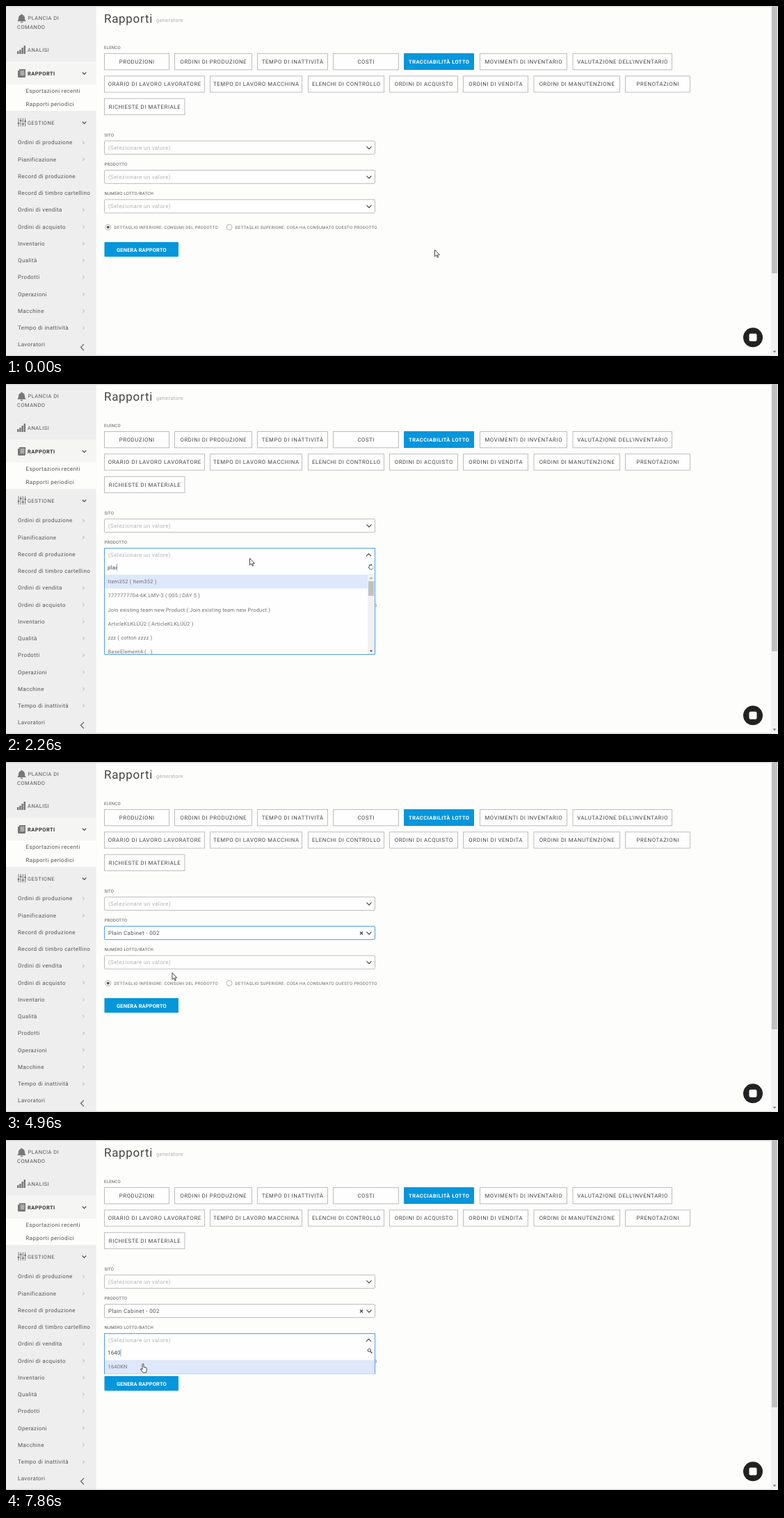
Recreate the animation shown at these times as an HTML page. Size 1110x504 px, loop 8000 ms.

```html
<!DOCTYPE html>
<html lang="it">
<head>
<meta charset="utf-8">
<title>Rapporti</title>
<style>
html, body { margin: 0; width: 100%; height: 100%; overflow: hidden; background: #fdfdfc; }
svg { display: block; width: 1110px; height: 504px; font-family: Roboto, "Noto Sans", sans-serif; text-rendering: geometricPrecision; }
text { fill: #555; white-space: pre; }
.title { font-size: 17px; letter-spacing: .7px; fill: #444; }
.sub { font-size: 7.5px; letter-spacing: .3px; fill: #b0b0b0; }
.head { font-size: 7.5px; letter-spacing: .5px; }
.bold { font-weight: 700; fill: #333; letter-spacing: .45px; }
.item { font-size: 8px; letter-spacing: .38px; }
.hint { fill: #b4b4b4; }
.label { font-size: 6px; letter-spacing: .25px; }
.radio { font-size: 6px; letter-spacing: .33px; fill: #666; }
.tab { font-size: 7.8px; letter-spacing: .6px; fill: #444; text-anchor: middle; }
.active { font-size: 7.5px; font-weight: 700; letter-spacing: .45px; fill: #fff; }
.go { font-size: 7.5px; font-weight: 700; letter-spacing: .15px; fill: #fff; text-anchor: middle; }
.opt { font-size: 7.5px; letter-spacing: .2px; fill: #707070; }
.typed { font-size: 8px; letter-spacing: .15px; fill: #444; }
.line { fill: none; stroke: #444; stroke-width: 1.2; }
.thin { fill: none; stroke: #a5a5a5; stroke-width: .9; }
.box { fill: #fefefe; stroke: #bdbdbd; }
.focus { stroke: #4f9fe0; }
.icon { fill: #777; }
.pointer { fill: #fff; stroke: #333; stroke-width: .9; stroke-linejoin: round; }
</style>
</head>
<body>
<svg id="stage" viewBox="0 0 1110 504"></svg>
<script>
const LOOP = 8000;
const HINT = '(Selezionare un valore)';
const SIZES = { title: 17, item: 8, typed: 8, label: 6, radio: 6, tab: 7.8 };

// y is the middle of the capitals
const text = (x, y, cls, str, id = '') => {
  const size = SIZES[cls.split(' ')[0]] || 7.5;
  return `<text x="${x}" y="${y + size * .356}" class="${cls}" ${id && `id="${id}"`}>${str}</text>`;
};
const rect = (x, y, w, h, fill, extra = '') =>
  `<rect x="${x}" y="${y}" width="${w}" height="${h}" fill="${fill}" ${extra}/>`;
const path = (d, cls, extra = '') => `<path d="${d}" class="${cls}" ${extra}/>`;
const group = (id, body) => `<g id="${id}">${body}</g>`;
const down = (x, y, r = 3.5) => path(`M${x - r} ${y - r / 2}l${r} ${r} ${r} ${-r}`, 'line');
const up = (x, y) => path(`M${x - 3.5} ${y + 1.8}l3.5 -3.5 3.5 3.5`, 'line');

function sidebar() {
  let s = rect(0, 0, 129.5, 504, '#eeeeee') + rect(0, 80, 129.5, 33, '#f5f5f4') + rect(0, 113, 129.5, 38, '#fdfdfc');
  s += path('M16 22q2-1 2-5 .3-3.500 3.500-4.300v-1h2v1q3.200.8 3.500 4.300 0 4 2 5zM20.500 22.700h4q-.4 1.600-2 1.600t-2-1.600z', 'icon');
  [4, 6, 9, 12].forEach((h, i) => s += rect(16 + i * 3.2, 69 - h, 2.4, h, '#777'));
  s += path('M19 91h9v10.500q0 1.500-1.500 1.500h-8q-1.500 0-1.500-1.500V93h2z', 'icon');
  [93.5, 96, 98.5].forEach(y => s += rect(20.5, y, 6, 1, '#f5f5f4'));
  [169, 165, 170, 166].forEach((y, i) => {
    const x = 18 + i * 3.2;
    s += rect(x - .5, 161.5, 1, 12, '#777') + rect(x - 1.3, y - 1, 2.6, 2, '#777');
  });
  s += text(31.5, 17, 'head', 'PLANCIA DI') + text(16, 30, 'head', 'COMANDO');
  s += text(31, 63, 'head', 'ANALISI') + text(31, 97, 'head bold', 'RAPPORTI') + text(31, 168, 'head', 'GESTIONE');
  s += text(28.5, 122.5, 'item', 'Esportazioni recenti') + text(28.5, 141, 'item', 'Rapporti periodici');
  s += down(112.5, 97, 2.8) + down(112.5, 168, 2.8);
  ['Ordini di produzione', 'Pianificazione', 'Record di produzione', 'Record di timbro cartellino',
    'Ordini di vendita', 'Ordini di acquisto', 'Inventario', 'Qualità', 'Prodotti', 'Operazioni',
    'Macchine', 'Tempo di inattività', 'Lavoratori'].forEach((name, i) => {
    const y = 196.5 + i * 24.25;
    s += text(17, y, 'item', name);
    if (![2, 3, 12].includes(i)) s += path(`M110.500 ${y - 2}l2 2.200 -2 2.200`, 'thin');
  });
  return s + path('M112 487l-4.500 4.500 4.500 4.500', 'line', 'style="stroke:#666"');
}

function tabs() {
  const rows = [
    [68.5, ['PRODUZIONI', 141.5, 93], ['ORDINI DI PRODUZIONE', 242.5, 111], ['TEMPO DI INATTIVITÀ', 361.5, 101],
      ['COSTI', 470.5, 94], ['TRACCIABILITÀ LOTTO', 572, 101], ['MOVIMENTI DI INVENTARIO', 681.5, 125],
      ["VALUTAZIONE DELL'INVENTARIO", 815, 142.5]],
    [100.8, ['ORARIO DI LAVORO LAVORATORE', 141.5, 144], ['TEMPO DI LAVORO MACCHINA', 293.5, 132],
      ['ELENCHI DI CONTROLLO', 434.5, 109], ['ORDINI DI ACQUISTO', 551.5, 98], ['ORDINI DI VENDITA', 657.5, 93],
      ['ORDINI DI MANUTENZIONE', 759, 123.5], ['PRENOTAZIONI', 890.5, 93]],
    [133.3, ['RICHIESTE DI MATERIALE', 141.5, 115.5]]
  ];
  return rows.map(([y, ...list]) => list.map(([name, x, w]) => {
    const active = name.startsWith('TRACC');
    return (active ? rect(x, y - .5, w, 24, '#0596db', 'rx="1"') : rect(x, y, w, 23.3, '', 'class="box"')) +
      text(x + w / 2 + .3, y + 11.8, active ? 'tab active' : 'tab', name);
  }).join('')).join('');
}

function field(y, label, id) {
  return text(141.5, y - 8.5, 'label', label) +
    rect(141.5, y, 389, 19.2, '', `class="box" rx="1.500" id="${id}"`) +
    text(147, y + 9.7, 'item hint', HINT, id + 'Hint') + down(522, y + 9.8);
}

function form() {
  let s = text(141, 18, 'title', 'Rapporti') + text(216, 20.8, 'sub', 'generatore');
  s += text(141, 60, 'label', 'ELENCO') + tabs();
  s += field(194.3, 'SITO', 'site') + field(236.5, 'PRODOTTO', 'product') + field(278.8, 'NUMERO LOTTO/BATCH', 'lot');
  s += group('chosen', text(147, 246.2, 'item', 'Plain Cabinet - 002') +
    path('M509 244.500l4 4m0-4l-4 4', 'line'));
  [146.8, 321].forEach(x => s += `<circle cx="${x}" cy="318.500" r="4" fill="#fefefe" stroke="#aaa" stroke-width=".9"/>`);
  s += '<circle cx="146.800" cy="318.500" r="1.900" fill="#555"/>';
  s += text(155.5, 318.5, 'radio', 'DETTAGLIO INFERIORE: CONSUMI DEL PRODOTTO');
  s += text(329.5, 318.5, 'radio', 'DETTAGLIO SUPERIORE: COSA HA CONSUMATO QUESTO PRODOTTO');
  return s + rect(141.5, 340, 106.5, 21, '#0596db', 'rx="1"') + text(195, 351, 'go', 'GENERA RAPPORTO');
}

function chrome() {
  return rect(0, 0, 1100, 1.4, '#d6d6d6') + rect(0, 502.6, 1100, 1.4, '#d9d9d9') +
    rect(1100, 0, 10, 504, '#f1f1f1') + rect(1101, 0, 8, 385, '#c1c1c1') +
    path('M1102.500 496.500h5l-2.500 2.700z', 'icon') +
    '<circle cx="1074" cy="477.300" r="14" fill="#222"/>' + rect(1068.5, 471.8, 11, 11, '#fff', 'rx="2"');
}

function spinner(id, y) {
  let dots = '';
  for (let i = 0; i < 8; i++) {
    const a = i * Math.PI / 4;
    dots += `<circle cx="${525 + 3.3 * Math.cos(a)}" cy="${y + 3.3 * Math.sin(a)}" r="1" fill="#222"/>`;
  }
  return group(id, dots);
}

// Open drop-down; rows start 38 px below its top
function panel(id, y, lists) {
  let s = rect(141.5, y, 389, 49, '', `class="box focus" id="${id}Box"`) +
    text(147, y + 9.7, 'item hint', HINT) + up(521.5, y + 9.5);
  s += rect(142, y + 38, 388, 20, '#dfe7fb', `id="${id}Mark"`);
  s += text(143, y + 44.5, 'opt hint', '..', id + 'Wait');
  lists.forEach((list, n) => {
    s += group(id + 'List' + n, list.map((name, i) => text(146.5, y + 48 + i * 20.2, 'opt', name)).join(''));
  });
  s += text(146, y + 27.2, 'typed', '', id + 'Text') + rect(0, y + 22, .8, 11, '#7d9cc0', `id="${id}Caret"`);
  s += spinner(id + 'Spin', y + 27.2);
  s += group(id + 'Lens', `<circle cx="522.300" cy="${y + 24}" r="2.200" class="line" style="stroke-width:1"/>` +
    path(`M524 ${y + 25.7}l2.500 2.500`, 'line'));
  return group(id, s);
}

function listBar() {
  return group('listBar', rect(520, 275, 10, 114, '#f1f1f1') + rect(521, 284, 8, 21, '#c1c1c1') +
    path('M522.800 280.500h4.400l-2.200-2.400z', 'icon', 'style="fill:#999"') +
    path('M522.800 383.500h4.400l-2.200 2.400z', 'icon', 'style="fill:#444"'));
}

const LONG = ['Item352 ( Item352 )', '7777777704-6K.LMV-3 ( 005 | DAY 5 )',
  'Join existing team new Product ( Join existing team new Product )',
  'ArticleKLKLÜÜ2 ( ArticleKLKLÜÜ2 )', 'zzz ( cotton zzzz )', 'BaseElement4 ( . )'];
const SHORT = ['Plain Cabinet ( Plain Cabinet )', 'Plain Cabinet - 002', 'Plain Cabinet - WIP'];

document.getElementById('stage').innerHTML = sidebar() + form() + chrome() +
  '<clipPath id="clip"><path d="M141 230h390v159H141z"/></clipPath>' +
  `<g clip-path="url(#clip)">${panel('a', 236.5, [LONG, SHORT])}${listBar()}</g>` +
  `<path id="edge" d="M141.500 389.500h389" class="line focus" style="stroke:#4f9fe0;stroke-width:1"/>` +
  panel('b', 278.8, [['1640KN']]) +
  group('arrow', path('M0 0V9.800L2.300 7.800 3.900 11.200 5.300 10.600 3.800 7.300H6.800Z', 'pointer')) +
  group('hand', path('M3 1.300a1 1 0 0 1 2 0V5l3.400.8q1.200.3 1.100 1.700L9.200 10.500 8.300 13H4.200L1 9Q.2 7.700 1.200 7.300L3 8.500Z', 'pointer'));

const el = {};
document.querySelectorAll('[id]').forEach(n => el[n.id] = n);

const show = (id, on) => el[id].setAttribute('display', on ? 'inline' : 'none');
const within = (t, a, b) => t >= a && t < b;

const KEYS_A = [1800, 1930, 2070, 2220, 2350, 2520, 2700, 2900, 3080, 3300, 3600];
const KEYS_B = [6250, 6420, 6580, 6760];
const ROUTE = [[360, 616.5, 351], [980, 350.5, 251], [4200, 350.5, 251], [4520, 240, 300.5], [4570, 240, 300.5],
  [4730, 239, 303.5], [5230, 239, 303.5], [5420, 233.5, 286], [7300, 233.5, 286], [7560, 200, 337.5],
  [7760, 195, 324], [7850, 193, 322]];

function pointerAt(t) {
  const next = ROUTE.findIndex(p => p[0] > t);
  if (next < 1) return (next ? ROUTE[ROUTE.length - 1] : ROUTE[0]).slice(1);
  const [a, b] = [ROUTE[next - 1], ROUTE[next]];
  const k = (t - a[0]) / (b[0] - a[0]);
  const e = k * k * (3 - 2 * k);
  return [a[1] + (b[1] - a[1]) * e, a[2] + (b[2] - a[2]) * e];
}

function typing(id, word, keys, t, caret) {
  el[id + 'Text'].textContent = word.slice(0, keys.filter(k => k <= t).length);
  el[id + 'Caret'].setAttribute('x', 146 + el[id + 'Text'].getComputedTextLength());
  show(id + 'Caret', caret);
}

function busy(id, on, t) {
  show(id + 'Spin', on);
  show(id + 'Lens', !on);
  const step = Math.floor(t / 100);
  [...el[id + 'Spin'].children].forEach((dot, i) => dot.setAttribute('opacity', 1 - ((step - i) % 8 + 8) % 8 * .12));
}

function draw(t) {
  const loaded = t >= 1600, narrowed = t >= 3800;
  show('a', within(t, 1060, 4960));
  el.aBox.setAttribute('height', narrowed ? 98 : loaded ? 153 : 49);
  show('aMark', loaded);
  el.aMark.setAttribute('y', t >= 4600 ? 294.5 : 274.5);
  show('aWait', !loaded);
  show('aList0', loaded && !narrowed);
  show('aList1', narrowed);
  show('listBar', loaded && !narrowed);
  show('edge', loaded && !narrowed);
  typing('a', 'plain cabin', KEYS_A, t, !narrowed);
  busy('a', t < 1600 || within(t, 1800, 3860), t);

  const found = t >= 6150;
  show('b', t >= 5480);
  el.bBox.setAttribute('height', found ? 57.8 : 49);
  show('bMark', found);
  show('bWait', !found);
  show('bList0', found);
  typing('b', '1640', KEYS_B, t, true);
  busy('b', t < 6150 || within(t, 6250, 7200), t);

  show('chosen', t >= 4960);
  show('productHint', t < 4960);
  el.product.classList.toggle('focus', within(t, 4960, 5480));

  const [x, y] = pointerAt(t);
  const hand = within(t, 4200, 4960) && y > 274 || t > 7300 && y > 316;
  show('hand', hand);
  show('arrow', !hand);
  el[hand ? 'hand' : 'arrow'].setAttribute('transform', `translate(${x} ${y})`);
}

let start;
function tick(now) {
  start ??= now;
  draw((now - start) % LOOP);
  requestAnimationFrame(tick);
}
draw(0);
requestAnimationFrame(tick);
</script>
</body>
</html>
```
